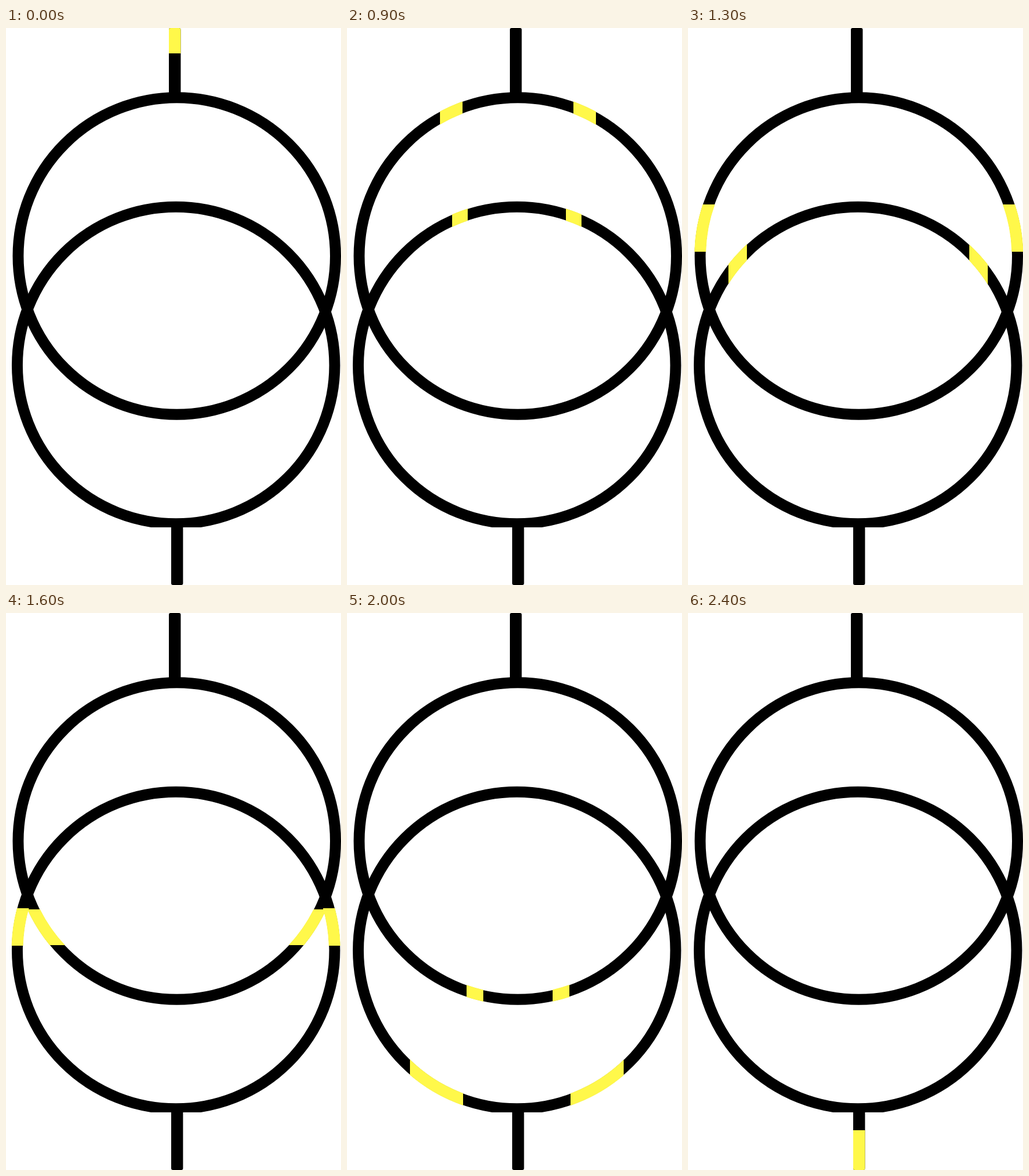
An HTML page with a canvas that plays this animation: 580 by 966 pixels, repeating every 2500 ms.

```html
<!DOCTYPE html>
<html lang="en">
<head>
<meta charset="utf-8">
<title>Transformer symbol</title>
<style>
html, body { margin: 0; width: 580px; height: 966px; overflow: hidden; background: #fff; }
canvas { display: block; }
</style>
</head>
<body>
<canvas id="stage" width="580" height="966"></canvas>
<script>
const ctx = document.getElementById('stage').getContext('2d');
const STEP = 100, STEPS = 25, R = 274.75, FLOOR = 866;
const BLACK = '#000', YELLOW = '#fff84a';

// Paths are key points [step, position] of each pulse, joined by straight lines.
// Ring positions are degrees from the top; stem positions are heights.
const rings = [
  { x: 295.75, y: 395.5,
    path: [[5, 0], [9, 20.5], [12, 47.2], [13, 71], [14, 88.5], [16, 115.5], [17, 130.9], [20, 161], [23, 180]] },
  { x: 294.25, y: 585,
    path: [[6, 0], [10, 24], [13, 44.5], [14, 54.9], [15, 61], [18, 102], [20, 137.6], [21, 160.2], [23, 180]] }
];
const stems = [
  { x: 282, top: 0, bottom: 112, corners: [3, 3, 0, 0], path: [[0, 0], [1, 44], [5, 112]] },
  { x: 286, top: FLOOR, bottom: 966, corners: [0, 0, 3, 3], path: [[23, FLOOR], [24, 897], [25, 966]] }
];

function along(path, step) {
  const i = path.findIndex(([s]) => s > step);
  if (i < 0) return path.at(-1)[1];
  const [s0, p0] = path[i - 1], [s1, p1] = path[i];
  return p0 + (p1 - p0) * (step - s0) / (s1 - s0);
}

// The stretch lit during one step, or null outside the path.
function litSpan(path, step) {
  if (step < path[0][0] || step >= path.at(-1)[0]) return null;
  return [along(path, step), along(path, step + 1)];
}

function clipped(x, y, w, h, paint) {
  ctx.save();
  ctx.beginPath();
  ctx.rect(x, y, w, h);
  ctx.clip();
  paint();
  ctx.restore();
}

function drawRing(ring, color, width) {
  ctx.strokeStyle = color;
  ctx.lineWidth = width;
  ctx.beginPath();
  ctx.arc(ring.x, ring.y, R, 0, 2 * Math.PI);
  ctx.stroke();
}

function drawStem(stem, color) {
  ctx.fillStyle = color;
  ctx.beginPath();
  ctx.roundRect(stem.x, stem.top, 20.5, stem.bottom - stem.top, stem.corners);
  ctx.fill();
}

// An arc's ends are cut level on the flanks and upright elsewhere.
function cutAt(deg) {
  const a = deg * Math.PI / 180;
  return { dx: R * Math.sin(a), dy: -R * Math.cos(a), level: deg > 60 && deg < 133 };
}

function lightArc(ring, side, from, to) {
  let near = 0, far = 300, top = -300, bottom = 300;
  const a = cutAt(from), b = cutAt(to);
  if (a.level) top = a.dy;
  else if (from < 90) near = a.dx;
  else { far = a.dx; top = 0; }
  if (b.level) bottom = b.dy;
  else if (to < 90) { far = b.dx; bottom = 0; }
  else near = b.dx;
  // The wider stroke hides the soft dark edge underneath.
  clipped(Math.round(ring.x + side * near), Math.round(ring.y + top),
          Math.round(side * (far - near)), Math.round(bottom - top),
          () => drawRing(ring, YELLOW, 20));
}

function drawRings(step) {
  for (const ring of rings) drawRing(ring, BLACK, 19);
  for (const ring of rings) {
    const span = litSpan(ring.path, step);
    if (span) for (const side of [-1, 1]) lightArc(ring, side, ...span);
  }
}

function draw(step) {
  ctx.fillStyle = '#fff';
  ctx.fillRect(0, 0, 580, 966);
  clipped(0, 0, 580, FLOOR, () => drawRings(step));
  for (const stem of stems) {
    drawStem(stem, BLACK);
    const span = litSpan(stem.path, step);
    if (span) clipped(0, span[0], 580, span[1] - span[0], () => drawStem(stem, YELLOW));
  }
}

const start = performance.now();
function tick() {
  draw(Math.floor((performance.now() - start) / STEP) % STEPS);
  requestAnimationFrame(tick);
}
tick();
</script>
</body>
</html>
```
